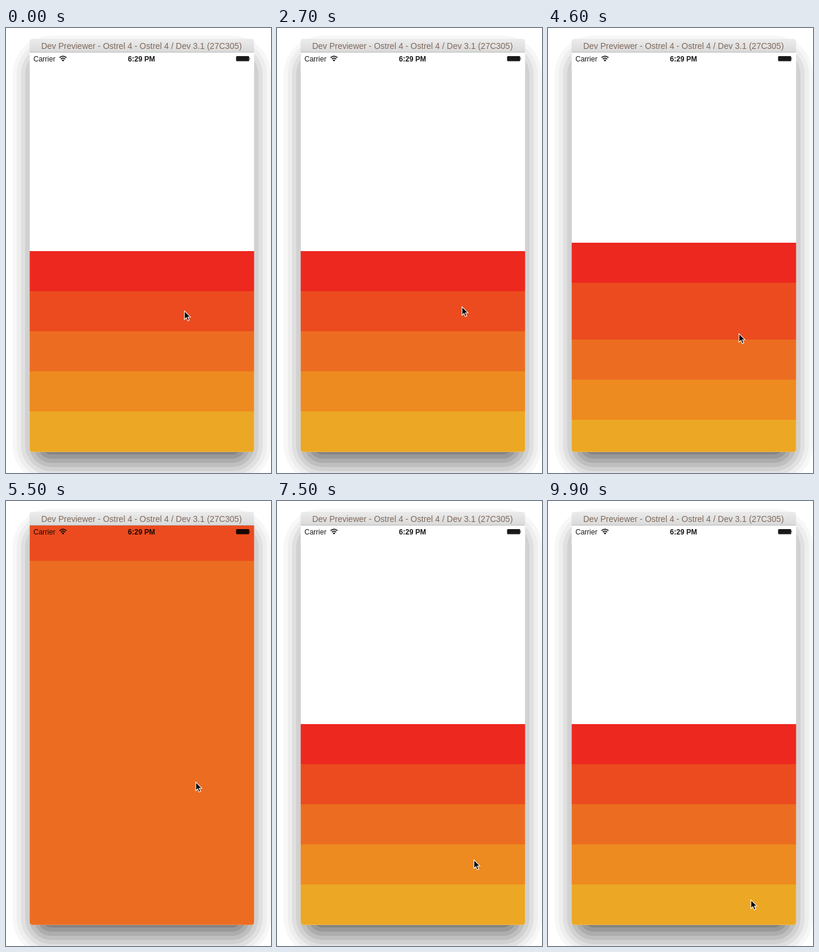
Recreate the animation shown at these times as an HTML page. Size 444 by 744 pixels, loop 10 s.

```html
<!DOCTYPE html>
<html lang="en">
<head>
<meta charset="utf-8">
<title>Expanding bands</title>
<style>
html, body { margin: 0; width: 100%; height: 100%; overflow: hidden; background: #fff; }
svg { display: block; width: 100%; height: 100%; }
text { font-family: "Liberation Sans", Arial, sans-serif; }
</style>
</head>
<body>
<svg viewBox="0 0 444 744">
  <defs>
    <linearGradient id="bar" x1="0" y1="0" x2="0" y2="1">
      <stop offset="0" stop-color="#ececec"/>
      <stop offset="1" stop-color="#d9d9d9"/>
    </linearGradient>
    <clipPath id="screen">
      <path d="M39.7 41H415.7V704Q415.7 708.7 411 708.7H44.5Q39.7 708.7 39.7 704Z"/>
    </clipPath>
  </defs>
  <g id="shadow"></g>
  <path d="M39.5 41V23Q39.5 18 44.5 18H410.5Q415.5 18 415.5 23V41Z" fill="url(#bar)"/>
  <rect x="40" y="40" width="375" height="1" fill="#bbb"/>
  <text x="227" y="35" font-size="14" text-anchor="middle" fill="#806a5c">Dev Previewer - Ostrel 4 - Ostrel 4 / Dev 3.1 (27C305)</text>
  <g clip-path="url(#screen)">
    <rect x="39" y="41" width="377" height="668" fill="#fff"/>
    <g id="bands"></g>
  </g>
  <g fill="#000" fill-opacity=".9">
    <text x="46" y="56" font-size="12">Carrier</text>
    <text x="227" y="56" font-size="12" font-weight="bold" text-anchor="middle">6:29 PM</text>
    <g fill="none" stroke="#000" stroke-opacity=".9" stroke-width="1.7">
      <path d="M89.7 49.6Q95.5 44.6 101.3 49.6"/>
      <path d="M91.9 52Q95.5 48.9 99.1 52"/>
    </g>
    <path d="M93.2 53.6Q95.5 51.8 97.8 53.6L95.5 56Z"/>
    <rect x="385.5" y="47" width="22" height="8.5" rx="1.5"/>
    <path d="M408.2 49.5Q409.8 51.2 408.2 53Z"/>
  </g>
  <g id="pointer">
    <g id="ring" fill="none">
      <circle r="20.7" stroke="#fff" stroke-opacity=".85" stroke-width="5.6"/>
      <circle r="20.7" stroke="#000" stroke-width="3.2"/>
    </g>
    <path d="M0 0V14.2L3.2 11.2L5.5 16.6L8 15.5L5.7 10.2H10Z" fill="#000" stroke="#fff" stroke-width="1.1"/>
  </g>
</svg>
<script>
const LOOP = 10000, STEP = 100, MOVE = 600, OPEN_FOR = 1250;
const TOP = 41, FIRST = 373, ROW = 67;
const colors = ["#ed281f", "#eb4b1f", "#ec6d21", "#ed8a20", "#eca824"];

// One visit per band: closing time and where the closing tap lands.
const visits = [
  { close: 1600, x: 299, y: 258 },
  { close: 4068, x: 319, y: 248 },
  { close: 6284, x: 316, y: 423 },
  { close: 8850, x: 314, y: 177 }
];

const $ = id => document.getElementById(id);
const ease = p => { p = Math.max(0, Math.min(1, p)); return p * p * (3 - 2 * p); };
const bandTop = i => FIRST + ROW * i;
const openTap = i => ({ x: 300 + 10 * i, y: bandTop(i) + 26 });

function addRect(parent, attrs) {
  const el = document.createElementNS("http://www.w3.org/2000/svg", "rect");
  for (const key in attrs) el.setAttribute(key, attrs[key]);
  return parent.appendChild(el);
}

for (let e = 29; e >= -20; e -= 7) {
  const g = Math.round(247 - 115 * Math.pow((29 - e) / 49, 1.3));
  addRect($("shadow"), {
    x: 40 - e, y: 42 - e, width: 375 + 2 * e, height: 691 + 2 * e,
    rx: 36 + e, fill: `rgb(${g},${g},${g})`
  });
}

const bands = colors.map(fill => addRect($("bands"), { x: 39, width: 377, fill }));

// The open band grows both ways, pushing the others apart.
function drawBands(t) {
  let active = visits.findIndex(v => t < v.close + MOVE), d = 0;
  if (active >= 0) {
    const { close } = visits[active];
    const amount = ease((t - close + OPEN_FOR) / MOVE) - ease((t - close) / MOVE);
    d = Math.round((bandTop(active) - TOP) * amount);
  }
  bands.forEach((band, i) => {
    band.setAttribute("y", bandTop(i) + (i <= active ? -d : d));
    band.setAttribute("height", i === active ? ROW + 2 * d : ROW + (i === 4 ? 1 : 0));
  });
}

function drawPointer(t) {
  let pos = { x: 299, y: 473 }, down = false;
  const glide = (to, from, time) => {
    const p = ease((t - from) / time);
    pos = { x: pos.x + (to.x - pos.x) * p, y: pos.y + (to.y - pos.y) * p };
  };
  const press = at => { down = down || (t > at - 30 && t < at + 130); };

  glide(openTap(0), 0, 340);
  visits.forEach((v, i) => {
    const open = v.close - OPEN_FOR;
    press(open);
    press(v.close);
    glide(v, open + 80, 700);
    glide(openTap(i + 1), v.close + 100, 520);
  });
  $("pointer").setAttribute("transform", `translate(${Math.round(pos.x)} ${Math.round(pos.y)})`);
  $("ring").setAttribute("visibility", down ? "visible" : "hidden");
}

function draw(now) {
  const t = Math.floor((now % LOOP) / STEP) * STEP;
  drawBands(t);
  drawPointer(t);
}

const start = performance.now();
function tick() {
  draw(performance.now() - start);
  requestAnimationFrame(tick);
}
tick();
</script>
</body>
</html>
```
